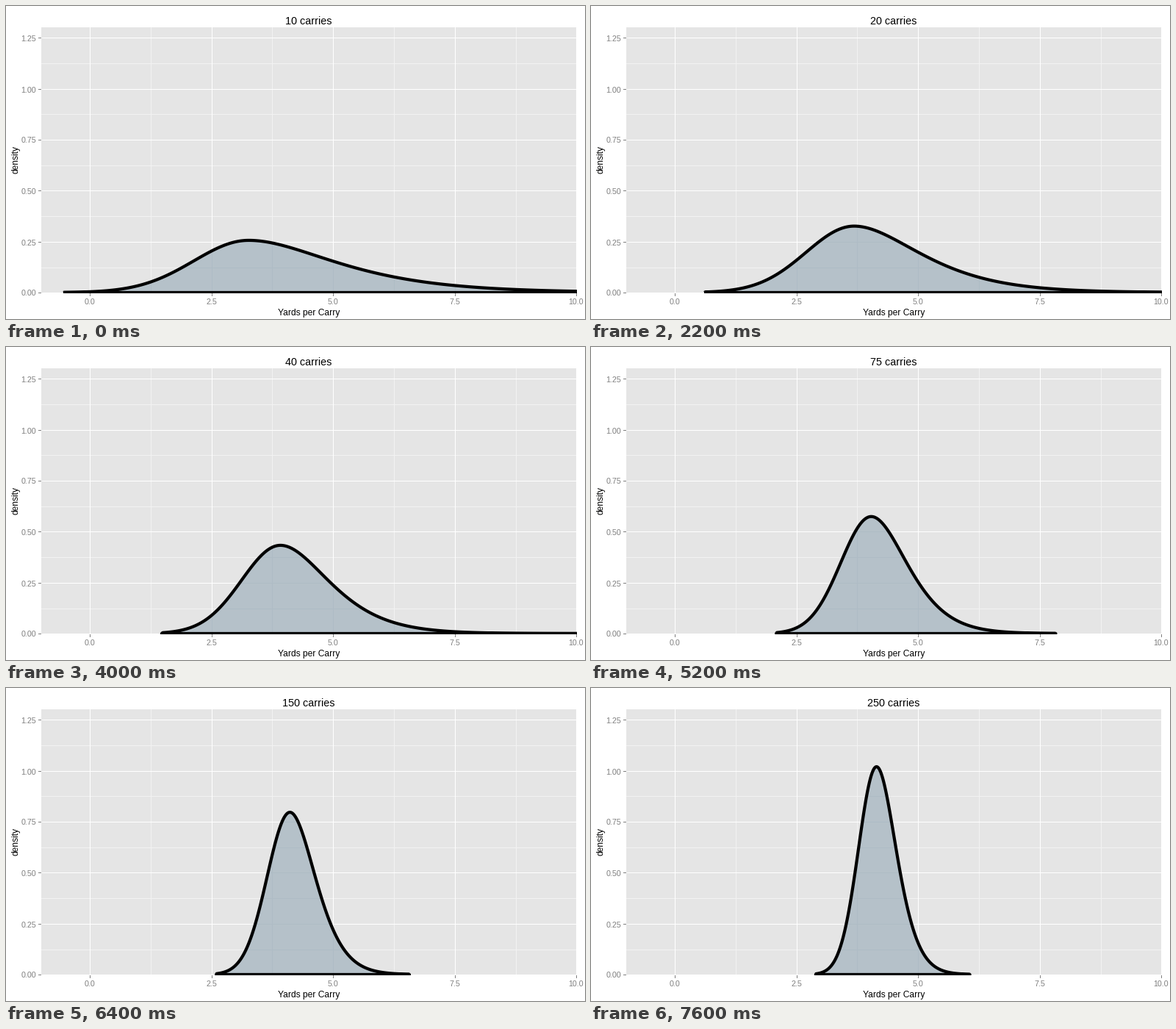
A matplotlib script that plays this animation: 788 by 426 pixels, repeating every 8 s.

```python
import numpy as np
import matplotlib.pyplot as plt
from matplotlib.animation import FuncAnimation
from matplotlib.patches import Polygon, Rectangle

W, H, DPI = 788, 426, 72
STEP, LOOP = 100, 8000
LEFT, TOP, RIGHT, BOTTOM = 48, 29, 777, 391
BASE, UNIT = 390, 277.7
CENTER = 4.2
GREY, MINOR = "#7F7F7F", "#F2F2F2"
FILL, FILL_LINE = "#B5C1C9", "#AEBCC5"

TIMES = [0, 1400, 2200, 2900, 3400, 4000, 4700, 5200, 5900, 6400, 7000, 7600]
CARRIES = [10, 15, 20, 25, 30, 40, 50, 75, 100, 150, 200, 250]


def px(v):
    return 48.15 + (v + 1) * 66.25


def py(v):
    return 390.75 - v * UNIT


def density(x, n):
    """Bell with a log-stretched right side; narrower and more even as n grows."""
    r = 10 / n
    peak = np.sqrt(0.025 + 0.00405 * n)
    z = (x - CENTER + 0.94 * r**0.85) * peak
    left = 0.47 - 0.13 * np.sqrt(r)
    right = 0.46 + 0.075 * r**0.3
    skew = 1.07 * r**0.22
    tail = np.log1p(skew * np.maximum(z, 0)) / np.log1p(skew * right)
    return peak * 0.5 ** np.where(z < 0, z / left, tail) ** 2


def outline(n):
    start = CENTER - 4.75 * (10 / n) ** 0.4
    end = min(CENTER + 1.1 + 189 / n, 10.5)
    x = np.linspace(start, end, 400)
    y = BASE - UNIT * density(x, n)
    y[[0, -1]] = BASE
    return np.column_stack([px(x), y])


shapes = [outline(n) for n in CARRIES]

plt.rcParams["font.family"] = "Liberation Sans"
fig = plt.figure(figsize=(W / DPI, H / DPI), dpi=DPI, facecolor="white")
ax = fig.add_axes([0, 0, 1, 1])
ax.set_xlim(0, W)
ax.set_ylim(H, 0)
ax.axis("off")


def box(x, y, w, h, color, z=1):
    patch = Rectangle((x, y), w, h, facecolor=color, lw=0,
                      antialiased=False, zorder=z)
    return ax.add_patch(patch)


def label(x, y, s, size, color="black", ha="center", **kw):
    return ax.text(x, y, s, fontsize=size, color=color, ha=ha, va="baseline", **kw)


panel = box(LEFT, TOP, RIGHT - LEFT, BOTTOM - TOP, "#E5E5E5")
area = Polygon(shapes[0], closed=True, facecolor=FILL, lw=0, zorder=2)
edge = Polygon(shapes[0], closed=True, fill=False, edgecolor="black",
               lw=4.2, joinstyle="round", zorder=4)
for shape in (area, edge):
    ax.add_patch(shape)
    shape.set_clip_path(panel)


def grid_line(x, y, w, h, color):
    """A grid line, with a faint trace of it across the filled area."""
    box(x, y, w, h, color)
    box(x, y, w, h, FILL_LINE, 3).set_clip_path(area)


def vline(v, color):
    grid_line(int(px(v)), TOP, 1, BOTTOM - TOP, color)


def hline(v, color):
    grid_line(LEFT, int(py(v)), RIGHT - LEFT, 1, color)


for i in range(5):
    if i < 4:
        vline(1.25 + 2.5 * i, MINOR)
    hline(0.125 + 0.25 * i, MINOR)
for i in range(6):
    v = 0.25 * i
    hline(v, "white")
    row = int(py(v))
    box(44, row, 4, 1, GREY)
    label(41, row + 4.5, f"{v:.2f}", 10.6, GREY, "right")
for i in range(5):
    v = 2.5 * i
    vline(v, "white")
    col = int(px(v))
    box(col, BOTTOM, 1, 4, GREY)
    label(col - 0.2, 406, f"{v:.1f}", 10.6, GREY)

label(411.7, 421, "Yards per Carry", 12)
label(16.5, 209, "density", 12, rotation=90, rotation_mode="anchor")
title = label(411.7, 25, "", 14.4)


def draw(frame):
    i = np.searchsorted(TIMES, frame * STEP, side="right") - 1
    area.set_xy(shapes[i])
    edge.set_xy(shapes[i])
    title.set_text(f"{CARRIES[i]} carries")
    return area, edge, title


anim = FuncAnimation(fig, draw, frames=LOOP // STEP, interval=STEP,
                     repeat=True, repeat_delay=0)
plt.show()
```
